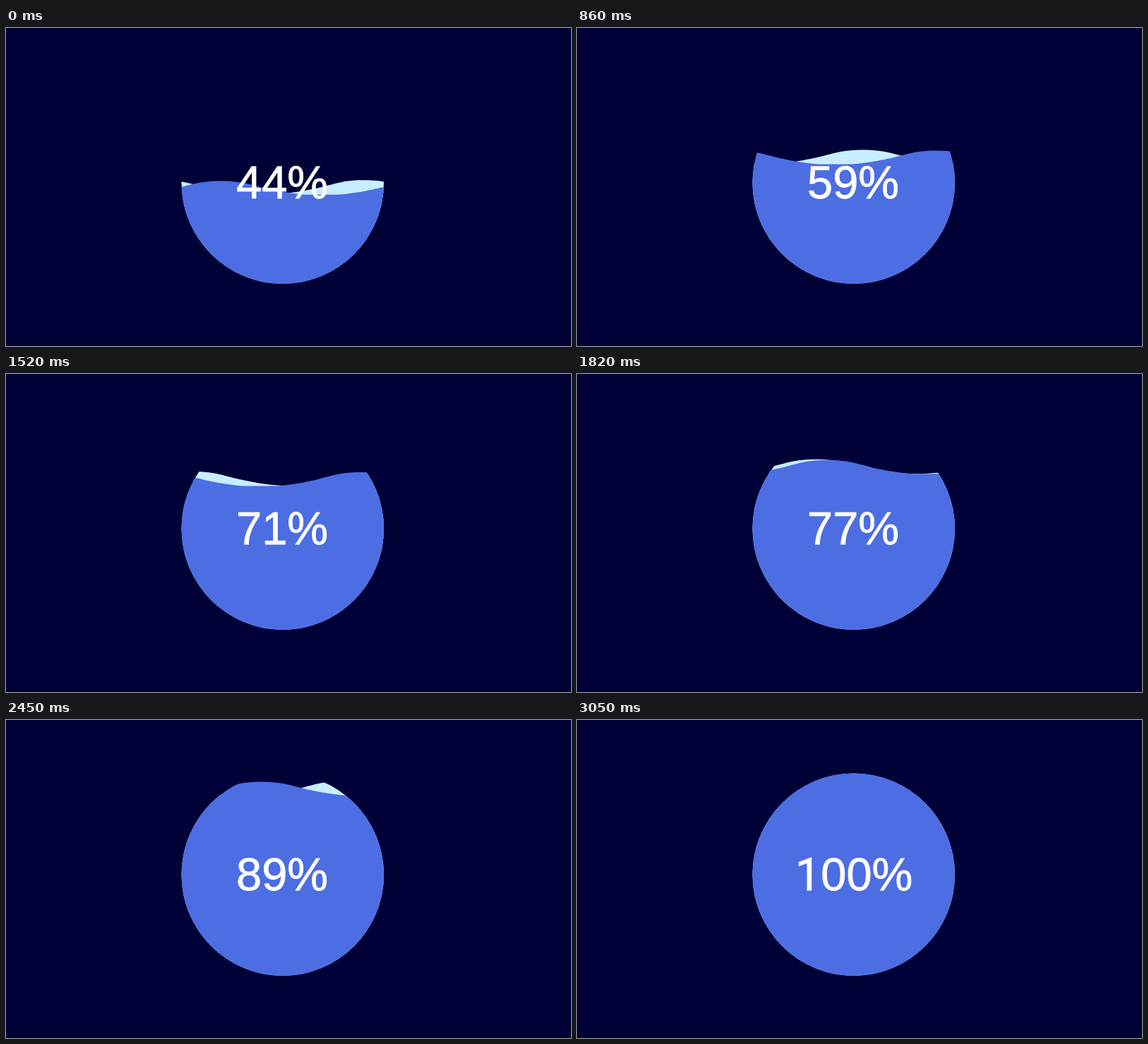
Recreate the animation shown at these times as an HTML page. Size 800 by 450 pixels, loop 3340 ms.

```html
<!DOCTYPE html>
<html lang="en">
<head>
<meta charset="utf-8">
<title>Water level</title>
<style>
  html, body { margin: 0; width: 100%; height: 100%; overflow: hidden; background: #000137; }
  svg { display: block; width: 800px; height: 450px; }
  text {
    font: 65px "Liberation Sans", Arial, sans-serif;
    fill: #fff; stroke: #fff; stroke-width: .8px; text-anchor: middle;
  }
  .one { font-family: Roboto, sans-serif; }
</style>
</head>
<body>
<svg viewBox="0 0 800 450">
  <clipPath id="bowl"><circle cx="391.75" cy="218.75" r="143.25"/></clipPath>
  <g clip-path="url(#bowl)">
    <path id="back" fill="#c7eeff"/>
    <path id="front" fill="#4d6de3"/>
  </g>
  <text id="label" x="391.1" y="241"></text>
</svg>
<script>
const LOOP = 3340, STEP = 46.4, DELAY = 9.4;
const SIZE = 286.5, LEFT = 248.5, TOP = 75.4, SCALE = SIZE / 280;
const back = document.getElementById('back');
const front = document.getElementById('front');
const label = document.getElementById('label');

// One wave from crest to crest, 280 wide and 20 high
const wave = 'c13.6-.1 24.3 1.4 31.5 2.7c10.5 2 14.5 3.8 30.1 7.4c.8.2 13.9 3.2 27.3 5.4' +
  'c12.3 2 29.6 4.1 51.1 4.5c21.5-.4 38.8-2.5 51.1-4.5c13.4-2.2 26.5-5.2 27.3-5.4' +
  'c15.6-3.6 19.6-5.4 30.1-7.4c7.1-1.3 17.9-2.8 31.5-2.7';
const body = 'M-280 0' + wave.repeat(3) + 'V320H-280z';
back.setAttribute('d', body);
front.setAttribute('d', body + 'M-280 19H560V320H-280z');

function place(path, x, y) {
  const shift = ((x % SIZE) + SIZE) % SIZE;
  path.setAttribute('transform', `translate(${LEFT + shift} ${y}) scale(${SCALE})`);
}

// The picture advances in even steps; the waves drift in opposite directions
let shown;
function draw(now) {
  const step = Math.max(0, Math.floor((now % LOOP - DELAY) / STEP));
  if (step === shown) return;
  shown = step;
  const percent = Math.min(100, 44 + Math.floor(step * .858 + .47));
  const crest = TOP + (1 - percent / 100) * SIZE - 20 * SCALE;
  const drift = 20.2 * step + .014 * step * step;
  place(back, drift / 2 - 28, crest);
  place(front, 55.5 - drift, crest + SCALE);
  label.innerHTML = percent < 100 ? percent + '%' : '<tspan class="one" dx="1">1</tspan>00%';
}

const begin = performance.now();
function tick() {
  draw(performance.now() - begin);
  requestAnimationFrame(tick);
}
tick();
</script>
</body>
</html>
```
